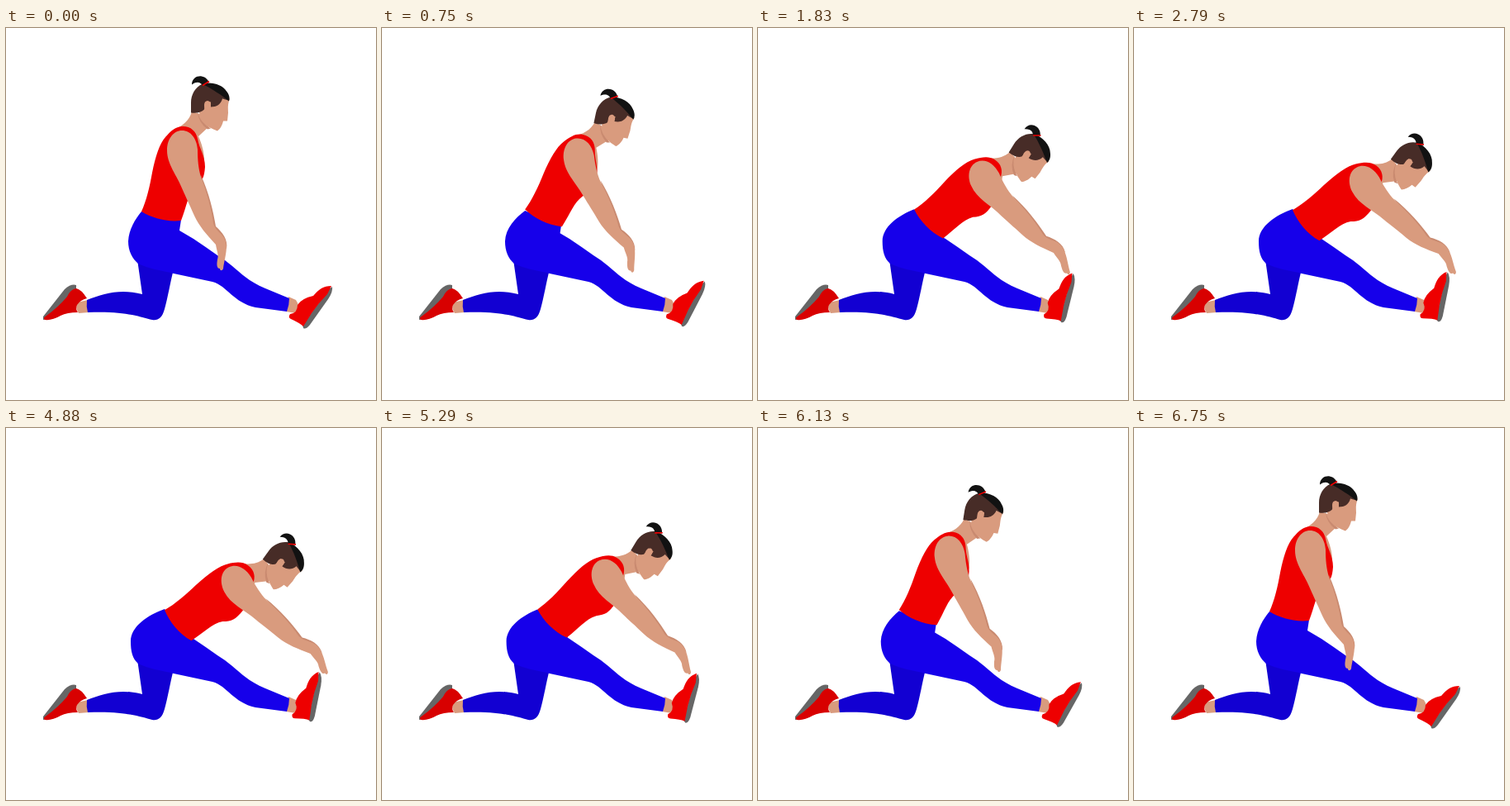
Recreate the animation shown at these times as an HTML page. Size 448 px wide and 450 px high, loop 6790 ms.

```html
<!DOCTYPE html>
<html lang="en">
<head>
<meta charset="utf-8">
<title>Hamstring stretch</title>
<style>
  html, body { margin: 0; width: 100%; height: 100%; overflow: hidden; background: #fff; }
  svg { display: block; width: 100vw; height: 100vh; }
  .skin { fill: #d99b7e; }
  .shade { fill: #c98a70; }
  .red { fill: #ee0000; }
  .dim { fill: #d80000; }
  .sole { fill: #666; }
  .far { fill: #1200d2; }
  .near { fill: #1600ea; }
  .brown { fill: #472c27; }
  .black { fill: #121212; }
</style>
</head>
<body>
<svg viewBox="0 0 448 450">
  <!-- kneeling leg -->
  <path class="skin" d="M86 332L99 329L100 344L88 345Q84 339 86 332Z"/>
  <path class="sole" d="M45 349L71 316Q79 309 85 311L85 317L50 352L45 353Z"/>
  <path class="dim" d="M85 315Q91 316 98 327Q90 329 86 335Q84 340 87 344Q74 344 66 348Q56 354 47 353Q44 351 49 348Q63 338 74 325Q78 316 85 315Z"/>
  <path class="far" d="M159 280L203 292C199 307 196 326 192 340C189 351 184 354 177 353C162 349 142 342 99 344Q97 337 98 329C118 321 139 315 165 322Z"/>

  <!-- stretched foot -->
  <path class="skin" d="M342 325L351 329Q357 337 351 345L339 343Z"/>
  <g id="foot">
    <path class="sole" d="M395 313Q396 319 390 328L368 359Q363 365 360 363L359 359L391 316Z"/>
    <path class="red" d="M353 335Q358 327 372 324C379 316 384 312 394 312L389 322Q378 333 370 345L360 361Q356 357 345 352Q341 350 344 346Q353 345 353 335Z"/>
  </g>

  <path id="pants" class="near"/>

  <g id="body">
    <path class="skin" d="M204 123C214 118 222 112 225 101L247 108L246 119L233 131C237 140 240 150 240 160L215 150Z"/>
    <g transform="translate(1 .5)">
      <path class="shade" d="M231 101Q234 114 247 121L243 122Q232 114 231 101Z"/>
      <path class="skin" d="M234 85L270 85C267 92 268 97 268 102L267 112L262 112C261 117 258 122 255 124C248 121 237 118 233 102Z"/>
      <path class="brown" d="M237 67C228 71 223 80 223 90L223 102C231 103 236 101 239 98L240 89L247 89L247 95C254 95 259 92 261 85L268 87L254 70Z"/>
      <ellipse class="skin" cx="243" cy="93" rx="4" ry="5.5"/>
      <path class="black" d="M236 67C248 64 261 68 266 76C270 81 270 85 269 88C260 81 249 73 236 67Z"/>
      <path class="black" d="M224 68C224 60 231 57 236 58C241 59 243 62 245 65L237 69C235 66 231 63 224 68Z"/>
      <path d="M237 69L245 64" stroke="#ee0000" stroke-width="1.6"/>
    </g>
    <path class="red" d="M164 222C170 209 174 192 177 175C181 155 186 140 193 132C200 124 206 119 214 119C224 119 230 125 232 134C234 146 241 154 241 168C240 181 238 185 229 192C220 202 219 215 212 233C195 235 177 230 164 222Z"/>
    <g id="arm">
      <path class="shade" d="M236 178C246 200 251 222 254 240C262 247 269 256 267 267L258 262L244 225Z"/>
      <path class="skin" d="M195 148C195 134 203 124 213 124C224 124 231 134 232 147C232 160 233 170 236 180C243 198 249 220 251 236C252 241 256 245 261 250C265 254 266 258 267 263C267 274 264 282 263 291C262 294 259 294 259 291C255 291 255 286 256 280C258 275 255 269 254 262C243 250 234 240 228 227C222 213 217 203 214 196C207 178 195 165 195 148Z"/>
    </g>
  </g>
</svg>
<script>
const LOOP = 6790;
const $ = id => document.getElementById(id);
const clamp = x => Math.min(1, Math.max(0, x));
const mix = (a, b, p) => a + (b - a) * p;
const bezier = (a, b, s) => 3 * (1 - s) ** 2 * s * a + 3 * (1 - s) * s * s * b + s ** 3;

// Quick reach with a long, soft settle.
function reach(x) {
  let lo = 0, hi = 1;
  for (let i = 0; i < 20; i++) {
    const mid = (lo + hi) / 2;
    if (bezier(.326, .382, mid) < x) lo = mid; else hi = mid;
  }
  return bezier(.32, 1, lo);
}
const smooth = x => x * x * (3 - 2 * x);

function lean(t) {
  return t < 4000 ? reach(clamp((t - 150) / 2640)) : 1 - smooth(clamp((t - 4850) / 1890));
}

function draw(p) {
  const at = (x0, y0, x1, y1) => `${mix(x0, x1, p)} ${mix(y0, y1, p)} `;
  const turn = (id, angle, x, y, shift = "") =>
    $(id).setAttribute("transform", `${shift} rotate(${angle} ${x} ${y})`);

  turn("body", 36 * p, 177, 263, `translate(${1.5 * p} ${-2 * p})`);
  turn("arm", -36 * p - 27 * p ** 1.2, 213.5, 143);  // the arm lags behind the torso
  turn("foot", -24 * p, 346, 340);
  $("pants").setAttribute("d",
    "M" + at(164, 222, 192, 219) +
    "C" + at(156, 232, 172, 226) + at(149, 243, 151, 240) + at(148, 258, 151, 258) +
    "C" + at(148, 270, 151, 270) + "153 279 160 285 C174 292 188 293 203 297 " +
    "L250 307 C268 312 275 332 302 338 L340 343 Q343 335 343 327 " +
    "L314 315 C293 306 285 297 274 288 Q266 281 256 275 Q242 265 227 255 " +
    "L" + at(210, 245, 227, 255) + "L" + at(212, 232, 227, 254) + "Z");
}

function tick(now) {
  draw(lean(now % LOOP));
  requestAnimationFrame(tick);
}
draw(0);
requestAnimationFrame(tick);
</script>
</body>
</html>
```
